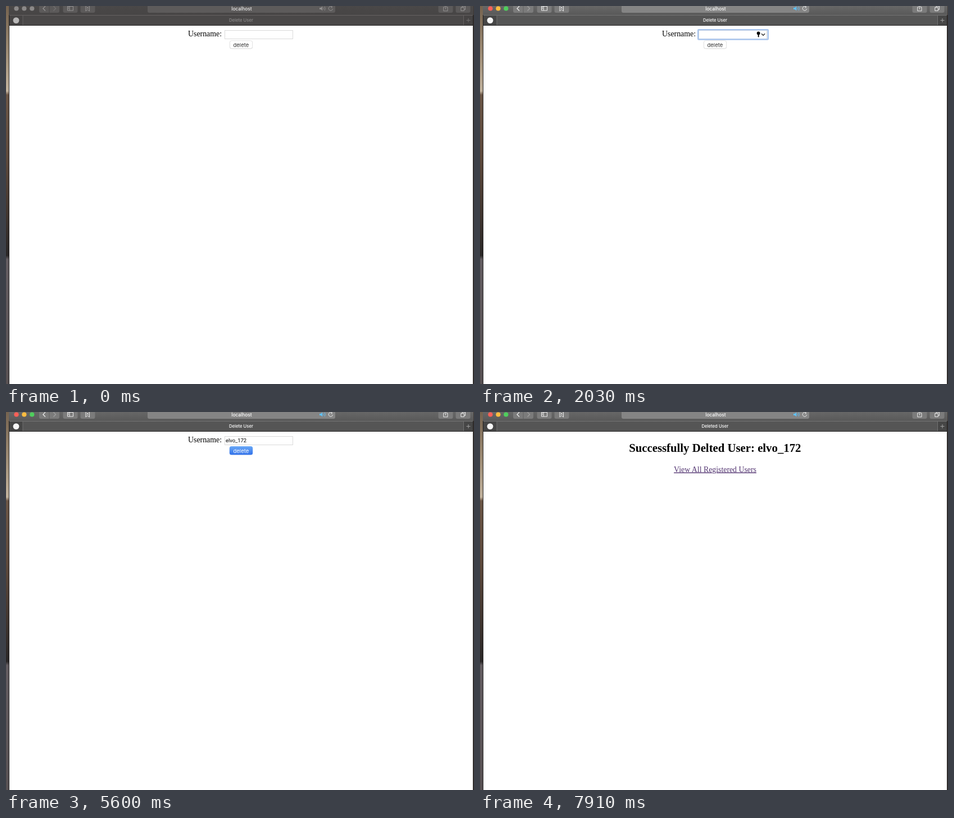
Recreate the animation shown at these times as an HTML page. Size 833 by 673 pixels, loop 8 s.

```html
<!DOCTYPE html>
<html lang="en">
<head>
<meta charset="utf-8">
<title>Delete User</title>
<style>
  html, body { margin: 0; width: 100%; height: 100%; overflow: hidden; background: #fff; }
  svg { display: block; width: 833px; height: 673px; }
  text { font-family: Inter, Roboto, sans-serif; }
  .serif { font-family: "Liberation Serif", "Times New Roman", serif; }
  .entry { font-family: Roboto, sans-serif; }
  .mid { text-anchor: middle; }
  .line { fill: none; stroke: var(--icon); stroke-width: 1; }

  /* Every animation shares one 8 s loop with hard changes by default. */
  .fx, .win { animation: 8s step-end infinite; }
  .win { animation-name: wake; }
  .form { animation-name: form; }
  .result { animation-name: result; }
  .ring { animation-name: ring; animation-timing-function: linear; }
  .tools { animation-name: tools; }
  .press { animation-name: press; }
  .stop { animation-name: stop; }
  .reload { animation-name: reload; }
  .share { animation-name: share; }
  .progress {
    animation-name: progress; animation-timing-function: linear;
    transform-origin: 252px 0;
  }

  @keyframes wake {
    0%, 100% {
      --top: #4a4848; --bar: #474545; --tab: #4a4848; --side: #454343; --rule: #686565;
      --btn: #5c5a5a; --field: #5d5b5b; --icon: #969494; --faint: #737171;
      --title: #8b8989; --host: #f0f0f0; --sound: #8f8d8d; --mark: #b8b7b7;
      --red: #8b8989; --yellow: #8b8989; --green: #8b8989;
    }
    13.125% {
      --top: #676767; --bar: #595959; --tab: #555; --side: #464646; --rule: #777;
      --btn: #7b7b7b; --field: #858585; --icon: #ececec; --faint: #a0a0a0;
      --title: #fff; --host: #fff; --sound: #5fc0f7; --mark: #f7f7f7;
      --red: #fb6058; --yellow: #fcbc40; --green: #4fce5d;
    }
  }
  @keyframes form { 0%, 100% { visibility: visible } 75.25% { visibility: hidden } }
  @keyframes result { 0%, 100% { visibility: hidden } 75.25% { visibility: visible } }
  @keyframes ring { 0%, 16.2% { opacity: 0 } 19.2%, 69.99% { opacity: 1 } 70%, 100% { opacity: 0 } }
  @keyframes tools { 0%, 100% { opacity: 0 } 16.625% { opacity: 1 } 70% { opacity: 0 } }
  @keyframes press { 0%, 100% { opacity: 0 } 70% { opacity: 1 } 75.25% { opacity: 0 } }
  @keyframes stop { 0%, 100% { opacity: 0 } 72.625% { opacity: 1 } 78.75% { opacity: 0 } }
  @keyframes reload { 0%, 100% { opacity: 1 } 72.625% { opacity: 0 } 78.75% { opacity: 1 } }
  @keyframes share { 0%, 100% { opacity: 1 } 72.625% { opacity: .4 } 75.25% { opacity: 1 } }
  @keyframes progress {
    0%, 72.6% { transform: scaleX(0); opacity: 1 }
    73.5% { transform: scaleX(.09) }
    74.7% { transform: scaleX(.25) }
    76%, 77.5% { transform: none; opacity: 1 }
    78.75%, 100% { transform: none; opacity: 0 }
  }
</style>
</head>
<body>
<svg viewBox="0 0 833 673">
  <defs>
    <linearGradient id="desk" x2="0" y2="1">
      <stop offset="0" stop-color="#75634f"/>
      <stop offset=".12" stop-color="#9c8a73"/>
      <stop offset=".225" stop-color="#c0b19c"/>
      <stop offset=".235" stop-color="#6a5545"/>
      <stop offset=".4" stop-color="#5c483b"/>
      <stop offset=".55" stop-color="#40352f"/>
      <stop offset=".66" stop-color="#292626"/>
      <stop offset=".67" stop-color="#625c60"/>
      <stop offset="1" stop-color="#575052"/>
    </linearGradient>
    <linearGradient id="blue" x2="0" y2="1">
      <stop offset="0" stop-color="#6aa8f6"/>
      <stop offset="1" stop-color="#3272ea"/>
    </linearGradient>
  </defs>

  <rect width="833" height="673" fill="#3b3634"/>
  <rect width="5" height="673" fill="url(#desk)"/>

  <g class="win">
    <linearGradient id="toolbar" x2="0" y2="1">
      <stop offset="0" stop-color="var(--top)" style="stop-color:var(--top)"/>
      <stop offset="1" stop-color="var(--bar)" style="stop-color:var(--bar)"/>
    </linearGradient>
    <rect x="5" width="827" height="673" fill="#1f1e1e"/>
    <rect x="6" y="35" width="825" height="638" fill="#fff"/>

    <!-- toolbar -->
    <rect x="5" width="827" height="16" fill="url(#toolbar)"/>
    <circle cx="18.5" cy="4.5" r="4.1" fill="var(--red)"/>
    <circle cx="32.4" cy="4.5" r="4.1" fill="var(--yellow)"/>
    <circle cx="46.3" cy="4.5" r="4.1" fill="var(--green)"/>
    <g fill="var(--btn)">
      <path d="M59 0H76.5V12H62Q59 12 59 9ZM77.5 0H95V9Q95 12 92 12H77.5Z"/>
      <rect x="101.5" y="-6" width="26" height="18" rx="3"/>
      <rect x="132.5" y="-6" width="26" height="18" rx="3"/>
      <rect x="800.5" y="-6" width="26" height="18" rx="3"/>
      <rect x="252" y="-6" width="334" height="18" rx="3" fill="var(--field)"/>
    </g>
    <g class="line">
      <path d="M70 .3L66 4.4L70 8.5" stroke-width="1.3"/>
      <path d="M84.5 .3L88.5 4.4L84.5 8.5" style="stroke:var(--faint)" stroke-width="1.3"/>
      <path d="M109.5 .5H119.5V8H109.5ZM113 .5V8M110.5 2.5H112M110.5 4.5H112"/>
      <path d="M141.9 -1V9L145.2 6.4L148.5 9V-1M143.3 1.3L147.1 5M147.1 1.3L143.3 5"/>
      <path d="M809.8 2.5H815.3V8.5H809.8ZM812 2.5V.3H817.5V6.3H815.3"/>
    </g>
    <g class="fx share">
      <rect x="769.5" y="-6" width="26" height="18" rx="3" fill="var(--btn)"/>
      <path class="line" d="M780.8 2H778.8V8.8H786V2H784M782.4 6V-1M780.4 .8L782.4 -1L784.4 .8"/>
    </g>
    <text class="mid" x="419.5" y="7.8" font-size="8.4" font-weight="500" fill="var(--host)">localhost</text>
    <path d="M558 3H560.2L563.3 .7V8.3L560.2 6H558Z" fill="var(--sound)"/>
    <path d="M565 2.6Q566.5 4.5 565 6.4M567 1Q569.7 4.5 567 8" fill="none" stroke="var(--sound)" stroke-width=".9"/>
    <g class="line">
      <path class="fx reload" d="M580.6 1.8A3.7 3.7 0 1 0 581.6 4.8M578.2 -.7L580.8 1.8L578.2 3.8"/>
      <path class="fx stop" d="M574.4 1L581.4 8M581.4 1L574.4 8"/>
    </g>
    <rect class="fx progress" x="252.5" y="10.3" width="333" height="1.6" rx=".6" fill="#62bdf5"/>

    <!-- tabs -->
    <rect x="6" y="16" width="825" height="18" fill="var(--tab)"/>
    <path d="M6 17H30V34H6ZM815 17H831V34H815Z" fill="var(--side)"/>
    <path d="M6 16.5H831M30 17V34M814.5 17V34" stroke="var(--rule)" stroke-width=".9"/>
    <path d="M5 34.5H832" stroke="#252424"/>
    <circle cx="18" cy="25.6" r="5.4" fill="var(--mark)"/>
    <path d="M819.5 25.5H826.5M823 22V29" stroke="var(--faint)"/>
    <g class="mid" font-size="7.7" font-weight="500" fill="var(--title)">
      <text class="fx form" x="418.4" y="28.3">Delete User</text>
      <text class="fx result" x="418.4" y="28.3">Deleted User</text>
    </g>
  </g>

  <!-- form page -->
  <g class="fx form">
    <text class="serif" x="324" y="54" font-size="13.86">Username:</text>
    <rect x="389.5" y="43.5" width="121" height="15" fill="#fff" stroke="#dadada"/>
    <rect class="fx ring" x="388.2" y="42.2" width="124.6" height="17.4" rx="1.2" fill="none" stroke="#a9c5ee" stroke-width="2.5"/>
    <g class="fx tools">
      <circle cx="495.6" cy="48.4" r="2.9"/>
      <path d="M494.7 50H496.6V54.8L495.6 55.8L494.7 54.8Z"/>
      <path d="M501 49.3L504.1 52.3L507.2 49.3" fill="none" stroke="#222" stroke-width="1.2"/>
    </g>
    <text id="typed" class="entry" x="391" y="54" font-size="9.4"></text>
    <rect id="caret" y="45" width="1" height="11"/>
    <rect x="398" y="62.2" width="41" height="14" rx="3.4" fill="#cfcfcf"/>
    <rect x="398.4" y="61.7" width="40.2" height="14" rx="3.2" fill="#fff" stroke="#dedede" stroke-width=".8"/>
    <text class="mid" x="418.4" y="72.5" font-size="9.5" fill="#333">delete</text>
    <g class="fx press">
      <rect x="397.8" y="61" width="41.4" height="15.3" rx="3.5" fill="url(#blue)"/>
      <text class="mid" x="418.4" y="72.5" font-size="9.5" fill="#fff">delete</text>
    </g>
  </g>

  <!-- result page -->
  <g class="fx result mid">
    <text class="serif" x="418.3" y="71.3" font-size="20.78" font-weight="700">Successfully Delted User: elvo_172</text>
    <text class="serif" x="418.5" y="106.6" font-size="13.82" fill="#553773" text-decoration="underline">View All Registered Users</text>
  </g>
</svg>
<script>
  const LOOP = 8000, FOCUS = 1330, SUBMIT = 5600;
  const user = "elvo_172";
  const keys = [2170, 2380, 2520, 2730, 3570, 3850, 3920, 4060];
  const typed = document.getElementById("typed");
  const caret = document.getElementById("caret");
  const start = performance.now();

  function draw() {
    const t = (performance.now() - start) % LOOP;
    const count = keys.filter(k => k <= t).length;
    typed.textContent = user.slice(0, count);

    // The blink restarts at each keystroke.
    const last = count ? keys[count - 1] : 1470;
    const lit = t < last || (t - last) % 1080 < 560;
    const width = count ? typed.getComputedTextLength() : 0;
    caret.setAttribute("x", 391 + Math.round(width));
    caret.style.opacity = t >= FOCUS && t < SUBMIT && lit ? 1 : 0;
    requestAnimationFrame(draw);
  }
  draw();
</script>
</body>
</html>
```
